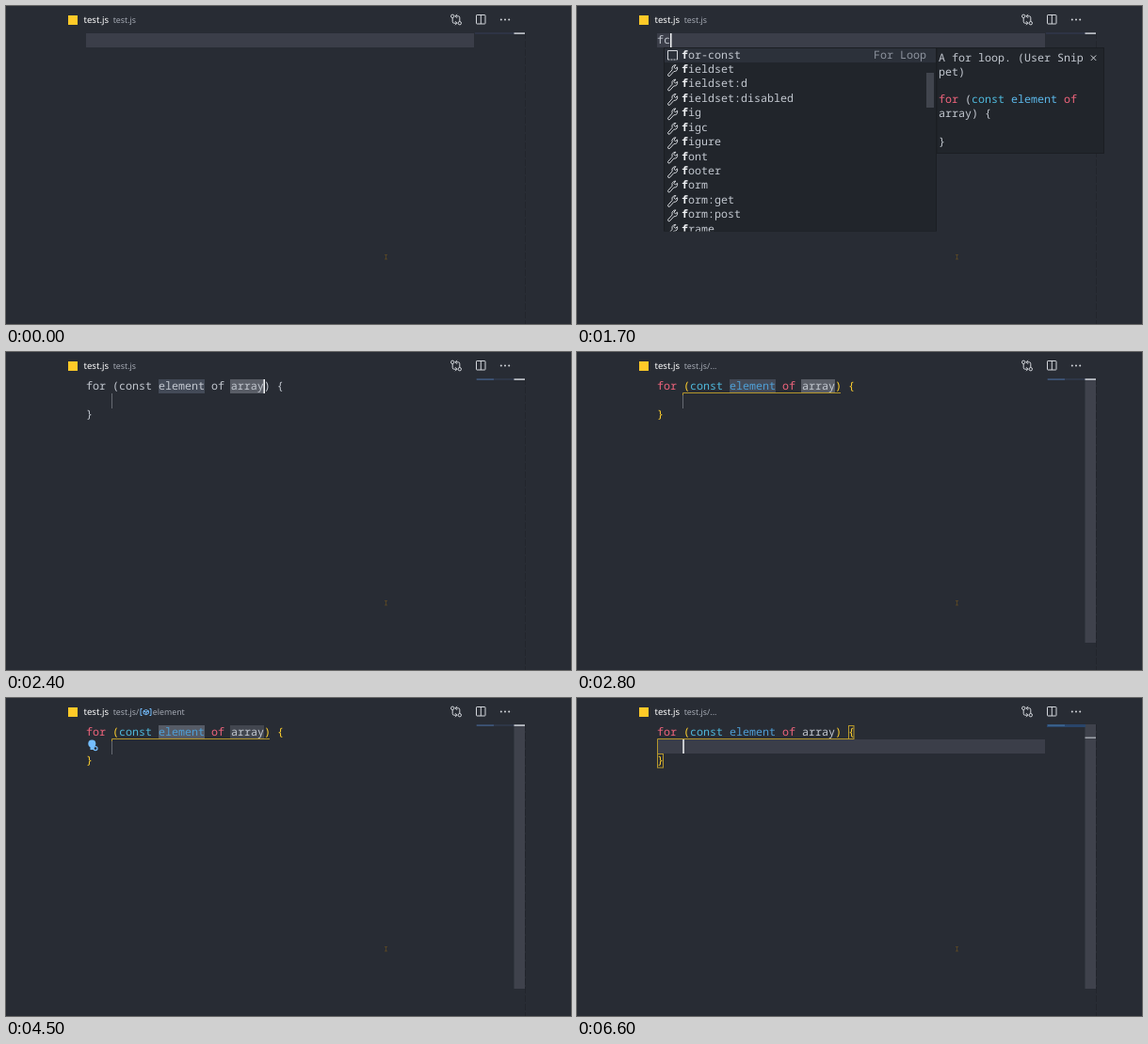
Animation of 600 by 338 pixels, one loop 6.7 s. Source, as an HTML page:

```html
<!DOCTYPE html>
<html lang="en">
<head>
<meta charset="utf-8">
<title>Snippet completion in an editor</title>
<style>
  html, body { margin: 0; width: 100%; height: 100%; overflow: hidden; background: #282c34; }
  svg { display: block; width: 100vw; height: 100vh; }
  text { white-space: pre; text-rendering: geometricPrecision; }
  .code { font: 11.667px "Noto Sans Mono", monospace; fill: #c3c8d0; }
  .ui { font: 8.8px "Noto Sans", "Open Sans", sans-serif; fill: #a4a9b3; }
  .title { font-size: 9.6px; fill: #fff; }
  .key { fill: #f0647c; }
  .decl { fill: #4fb9dc; }
  .name { fill: #4f9fd6; }
  .prop { fill: #5cb8ea; }
  .brace { fill: #ffd02e; }
  .dim { fill: #8d939e; }
  .line { fill: #3b3e49; }
  .caret { fill: #f4f5f7; }
  .panel { fill: #21252b; stroke: #1b1e23; }
  .icon { fill: none; stroke: #d4d7dc; }
  .pair { fill: none; stroke: #b5972c; }
  .hit { font-weight: 700; fill: #eef0f3; }
</style>
</head>
<body>
<svg viewBox="0 0 600 338" preserveAspectRatio="none">
  <!-- tab bar -->
  <rect x="66" y="10" width="10" height="10" fill="#ffca28"/>
  <text class="ui title" x="82.5" y="18.3">test.js</text>
  <text class="ui" x="113.7" y="18.2">test.js<tspan data-t="2600-4000 4600-6700">/...</tspan><tspan data-t="4000-4600">/</tspan></text>
  <g data-t="4000-4600">
    <path d="M144.5 11.5h-1.5v7h1.5M152.5 11.5h1.5v7h-1.5M146 13.8l2.6-1.3 2.8 1.2v2.6l-2.6 1.4-2.8-1.2zM146 13.8l2.8 1.2 2.6-1.3M148.8 15v2.7" fill="none" stroke="#75beff"/>
    <text class="ui" x="155.8" y="18.2">element</text>
  </g>
  <g class="icon">
    <circle cx="474.2" cy="10.8" r="1.7"/>
    <circle cx="481.8" cy="18.2" r="1.7"/>
    <path d="M474.2 12.5v4.2q0 1.5 1.5 1.5h3M477 16.2l2 2-2 2M481.8 16.5v-4.2q0-1.5-1.5-1.5h-3M479 8.8l-2 2 2 2"/>
    <rect x="499.5" y="9.5" width="9.5" height="9.5" rx=".6"/>
    <path d="M504.3 9.5v9.5"/>
  </g>
  <g fill="#d4d7dc"><circle cx="525.8" cy="14.6" r="1"/><circle cx="530" cy="14.6" r="1"/><circle cx="534.2" cy="14.6" r="1"/></g>

  <!-- minimap and scrollbar -->
  <path d="M551.5 28v310" stroke="#20232a" stroke-dasharray="7 2" opacity=".7"/>
  <rect data-t="2500-6700" x="539.5" y="28" width="11.5" height="281" fill="#3f424c"/>
  <rect data-t="0-2200" x="498" y="28.5" width="42" height="1" fill="#353c56"/>
  <g data-t="2200-4600">
    <rect x="499" y="28.5" width="41" height="1" fill="#34405a"/>
    <rect x="500" y="28.5" width="18" height="1.2" fill="#43618a"/>
  </g>
  <g data-t="4600-6700">
    <rect x="499" y="28" width="41" height="3" fill="#29456a"/>
    <rect x="500" y="28.5" width="18" height="1.2" fill="#43709c"/>
  </g>
  <rect data-t="0-4600" x="539.5" y="28.3" width="11.5" height="1.6" fill="#c5c9d0"/>
  <rect data-t="4600-6700" x="539.5" y="41.5" width="11.5" height="1.5" fill="#a0a4ac"/>

  <!-- typing -->
  <rect class="line" data-t="0-2200" x="85" y="29" width="412" height="15"/>
  <text class="code" x="85" y="39.6"><tspan data-t="1200-2200">f</tspan><tspan data-t="1600-2200">c</tspan></text>

  <!-- expanded snippet -->
  <rect class="line" data-t="4600-6700" x="85" y="44" width="412" height="15"/>
  <g data-t="2200-4000" fill="#434a57"><rect x="162" y="29" width="49" height="15"/><rect x="238" y="29" width="36" height="15" fill="#595d66"/></g>
  <g data-t="4000-4600" fill="#565b66"><rect x="162" y="29" width="49" height="15"/><rect x="238" y="29" width="36" height="15" fill="#42464f"/></g>
  <path data-t="2200-4600" d="M112.5 44v16" stroke="#666a72"/>
  <path class="pair" data-t="2600-4600" d="M112.5 46v-2.5h167.500"/>
  <g class="pair" data-t="4600-6700"><path d="M288 43.500h-202.500v15.500"/></g>
  <g class="pair" data-t="4700-6700"><rect x="288.500" y="29.500" width="5.500" height="14"/><rect x="85.500" y="59.500" width="6" height="14.500"/></g>
  <g class="code" data-t="2200-2600">
    <text x="85" y="39.6">for (const element of array) {</text>
    <text x="85" y="69.6">}</text>
  </g>
  <g class="code" data-t="2600-6700">
    <text x="85" y="39.6"><tspan class="key">for</tspan> <tspan class="brace">(</tspan><tspan class="decl">const</tspan> <tspan class="name">element</tspan> <tspan class="key">of</tspan> array<tspan class="brace">) {</tspan></text>
    <text class="brace" x="85" y="69.6">}</text>
  </g>
  <g data-t="4100-4600">
    <circle cx="91.3" cy="48.4" r="4" fill="#75beff"/>
    <path d="M89.5 51h3.600v4h-3.600z" fill="#75beff"/>
    <circle cx="95" cy="53.600" r="2" fill="#282c34" stroke="#75beff" stroke-width="1.2"/>
  </g>

  <!-- completion popup -->
  <g data-t="1500-2200">
    <rect class="panel" x="382" y="44.500" width="177.500" height="112"/>
    <path class="icon" d="M545.800 52.500l5.400 5.400m0-5.400l-5.400 5.400"/>
    <g class="code">
      <text x="384" y="59">A for loop. (User Snip</text>
      <text x="384" y="74">pet)</text>
      <text x="384" y="102.500"><tspan class="key">for</tspan> (<tspan class="decl">const</tspan> <tspan class="prop">element</tspan> <tspan class="key">of</tspan></text>
      <text x="384" y="118">array) {</text>
      <text x="384" y="148">}</text>
    </g>
  </g>
  <clipPath id="clip"><rect x="92" y="44" width="290" height="195.500"/></clipPath>
  <g id="full" data-t="1500-1800" clip-path="url(#clip)"></g>
  <g id="short" data-t="1800-2200" clip-path="url(#clip)"></g>

  <!-- carets -->
  <g class="caret">
    <rect data-t="100-500 1000-1200" x="85" y="29" width="1.500" height="15"/>
    <rect data-t="1200-1600" x="92" y="29" width="1.500" height="15"/>
    <rect data-t="1600-2200" x="99" y="29" width="1.500" height="15"/>
    <rect data-t="2200-2800 3300-3800" x="273.500" y="29" width="1.500" height="15"/>
    <rect data-t="4000-4500" x="210.500" y="29" width="1.500" height="15"/>
    <rect data-t="4600-5100 5600-6100 6600-6700" x="112.300" y="44" width="1.500" height="15"/>
  </g>

  <!-- mouse pointer -->
  <path d="M402 264.500h3M403.500 264.500v4.500M402 269h3" stroke="#5e4a24" stroke-width=".8"/>
</svg>
<script>
const LOOP = 6700, ROW = 15.42;
const words = ["for-const", "fieldset", "fieldset:d", "fieldset:disabled", "fig", "figc", "figure",
  "font", "footer", "form", "form:get", "form:post", "frame"];
const wrench = "M96.500 73l4.600-5.200q-1-3.200 1.600-4.700l2.200-.4-2 2.300 1.500 1.700 2.200-1.700q.7 4.600-3.800 4.600l-4.400 4.900q-1.700.7-1.900-1.500z";

// Embolden the typed letters in the order they occur.
function mark(word, typed) {
  let i = 0;
  return [...word].map(c => c === typed[i] ? (i++, `<tspan class="hit">${c}</tspan>`) : c).join("");
}

function fillList(id, typed, items) {
  const height = Math.min(195, items.length * ROW + 1);
  let out = `<rect class="panel" x="92.5" y="44.5" width="289" height="${height}"/>
    <rect x="93" y="45" width="288" height="15" fill="#2c313a"/>`;
  items.forEach((word, i) => {
    const y = i * ROW;
    out += `<text class="code" x="111" y="${55.6 + y}">${mark(word, typed)}</text>`;
    out += i ? `<path class="icon" d="${wrench}" transform="translate(0 ${y - ROW})"/>`
      : `<path class="icon" d="M96.500 57v-9.500h10v9.500"/><path class="icon" stroke-dasharray="2 1" d="M96.500 57h10"/>`;
  });
  out += `<text class="code dim" x="315" y="55.6">For Loop</text>`;
  if (items.length > 12) out += `<rect x="371" y="71" width="8" height="37" fill="#41454e"/>`;
  document.getElementById(id).innerHTML = out;
}

fillList("full", "f", words);
fillList("short", "fc", words.filter(w => /f.*c/.test(w)));

const timed = [...document.querySelectorAll("[data-t]")].map(el => ({
  el, spans: el.dataset.t.split(" ").map(s => s.split("-").map(Number))
}));

function draw() {
  const t = performance.now() % LOOP;
  for (const { el, spans } of timed)
    el.style.display = spans.some(([from, to]) => t >= from && t < to) ? "" : "none";
  requestAnimationFrame(draw);
}
draw();
</script>
</body>
</html>
```
